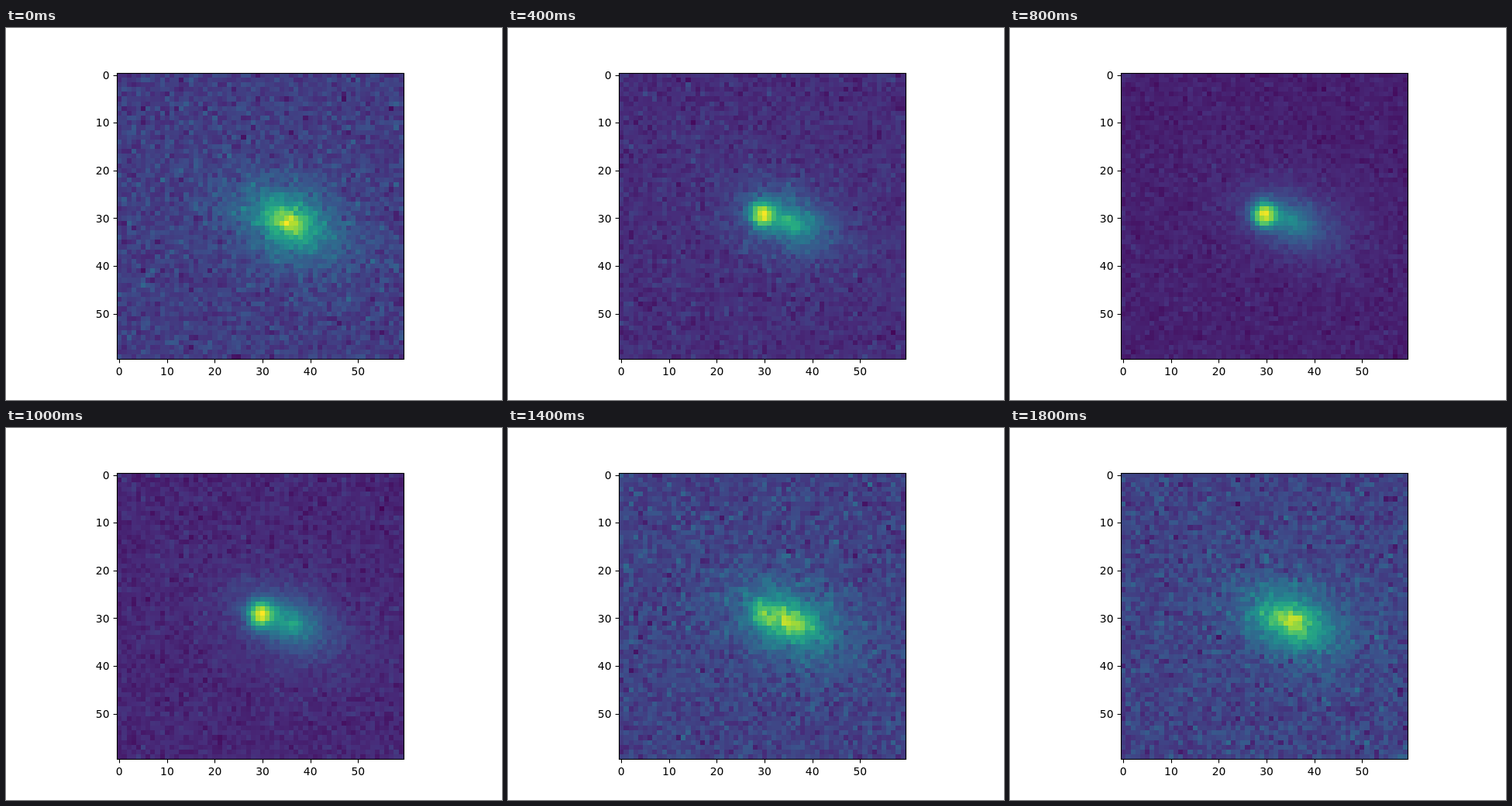
These frames come from a looping animation (640x480 px, 2 s). An HTML page with a canvas:

```html
<!DOCTYPE html>
<html>
<head>
<meta charset="utf-8">
<style>
html, body { margin: 0; width: 640px; height: 480px; overflow: hidden; background: #fff; }
canvas { display: block; }
</style>
</head>
<body>
<canvas id="plot" width="640" height="480"></canvas>
<script>
const ctx = document.getElementById('plot').getContext('2d');
const N = 60, CELL = 6.16, LEFT = 143.2, TOP = 57.6, STEP = 200;

// Sky level, galaxy brightness and point-source brightness for each exposure
const exposures = [
  [.18, .76, 0], [.175, .68, .33], [.13, .5, .63], [.085, .33, .79], [.09, .38, .75],
  [.11, .48, .67], [.19, .69, .45], [.195, .72, .26], [.2, .73, .1], [.2, .73, .07]
];

const viridis = [
  [68, 1, 84], [71, 44, 122], [59, 81, 139], [44, 113, 142], [33, 144, 141],
  [39, 173, 129], [92, 200, 99], [170, 220, 50], [253, 231, 37]
];

function colour(value) {
  const v = Math.min(1, Math.max(0, value)) * 8;
  const i = Math.min(7, Math.floor(v));
  const rgb = viridis[i].map((c, k) => Math.round(c + (viridis[i + 1][k] - c) * (v - i)));
  return `rgb(${rgb})`;
}

function seeded(seed) {
  return () => {
    seed = (seed + 0x6D2B79F5) | 0;
    let t = Math.imul(seed ^ (seed >>> 15), 1 | seed);
    t = (t + Math.imul(t ^ (t >>> 7), 61 | t)) ^ t;
    return ((t ^ (t >>> 14)) >>> 0) / 4294967296;
  };
}

const gaussian = random =>
  Math.sqrt(-2 * Math.log(1 - random())) * Math.cos(2 * Math.PI * random());

// Tilted elliptical disc with a softened exponential profile
function galaxy(x, y) {
  const dx = x - 35.5, dy = y - 30.8, tilt = 0.4;
  const along = (dx * Math.cos(tilt) + dy * Math.sin(tilt)) / 5.6;
  const across = (dy * Math.cos(tilt) - dx * Math.sin(tilt)) / 3.5;
  return Math.exp(0.35 - Math.hypot(along, across, 0.35));
}

const star = (x, y) => Math.exp(-((x - 29.5) ** 2 + (y - 29.2) ** 2) / (2 * 1.85 ** 2));

function drawImage(index) {
  const [sky, disc, point] = exposures[index];
  const random = seeded(index * 977 + 11);
  const edge = (start, i) => Math.round(start + i * CELL);
  for (let y = 0; y < N; y++) {
    for (let x = 0; x < N; x++) {
      const light = disc * galaxy(x, y) + point * star(x, y);
      const noise = gaussian(random) * sky / 4.2;
      ctx.fillStyle = colour(sky + light + noise);
      const px = edge(LEFT, x), py = edge(TOP, y);
      ctx.fillRect(px, py, edge(LEFT, x + 1) - px, edge(TOP, y + 1) - py);
    }
  }
}

function line(x1, y1, x2, y2) {
  ctx.beginPath();
  ctx.moveTo(x1, y1);
  ctx.lineTo(x2, y2);
  ctx.stroke();
}

function drawAxes() {
  ctx.strokeStyle = ctx.fillStyle = '#000';
  ctx.lineWidth = 1.11;
  ctx.font = '13.89px "DejaVu Sans", sans-serif';
  ctx.strokeRect(143.5, 58.5, 370, 369);
  for (let n = 0; n < N; n += 10) {
    const x = LEFT + (n + 0.5) * CELL, y = TOP + (n + 0.5) * CELL;
    const tx = Math.round(x) + 0.5, ty = Math.round(y) + 0.5;
    line(tx, 427.5, tx, 432.4);
    line(138.6, ty, 143.5, ty);
    ctx.textAlign = 'center';
    ctx.fillText(n, x, 448);
    ctx.textAlign = 'right';
    ctx.fillText(n, 133.5, Math.round(y + 5.2));
  }
}

let shown = -1;
function tick() {
  const index = Math.floor(performance.now() / STEP) % exposures.length;
  if (index !== shown) {
    shown = index;
    ctx.fillStyle = '#fff';
    ctx.fillRect(0, 0, 640, 480);
    drawImage(index);
    drawAxes();
  }
  requestAnimationFrame(tick);
}
tick();
</script>
</body>
</html>
```
